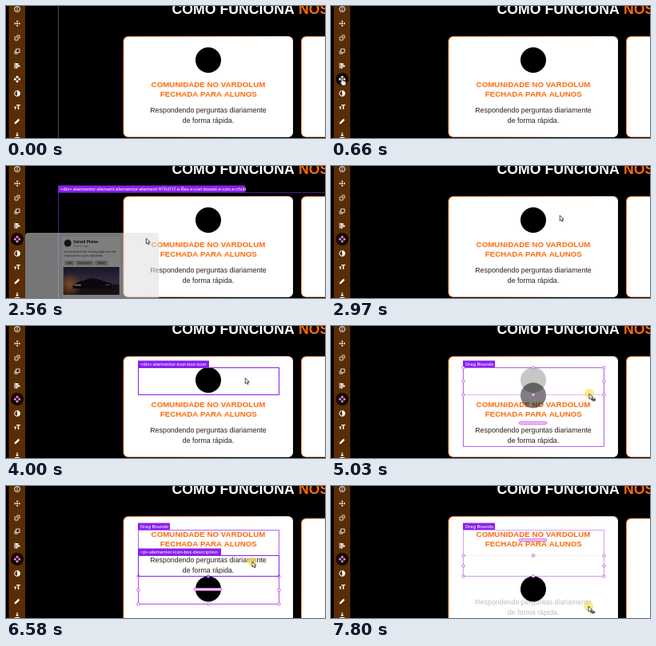
Animation of 399 by 166 pixels, one loop 8 s. Source, as an HTML page with a canvas:

```html
<!DOCTYPE html>
<html lang="pt">
<head>
<meta charset="utf-8">
<style>
html, body { margin: 0; width: 100%; height: 100%; overflow: hidden; background: #000; }
canvas { display: block; width: 399px; height: 166px; }
</style>
</head>
<body>
<canvas id="stage"></canvas>
<script>
const LOOP = 8000, W = 399, H = 166;
const ORANGE = '#ff6a0a', PURPLE = '#8a1ff0', PINK = '#c04be6';
const ARIAL = '"Liberation Sans", Arial, sans-serif';
const UI = 'Roboto, sans-serif';

const ratio = window.devicePixelRatio || 1;
const sized = canvas => Object.assign(canvas, { width: W * ratio, height: H * ratio });
const stage = sized(document.getElementById('stage')).getContext('2d');
const layer = sized(document.createElement('canvas')).getContext('2d');
let ctx = stage;

const between = (t, a, b) => t >= a && t < b;
const progress = (t, a, b) => Math.min(1, Math.max(0, (t - a) / (b - a)));
const ease = p => p * p * (3 - 2 * p);

// Pointer tip: time, x, y
const POINTER = [
  [70, 300, 172], [660, 13, 91], [2140, 13, 91], [2560, 175, 91], [2900, 284, 62],
  [3030, 288, 62], [3650, 288, 62], [3950, 296, 66], [4420, 326, 61], [4760, 326, 61],
  [5030, 323, 85], [5400, 319, 118], [5970, 319, 118], [6500, 308, 95], [6780, 308, 95],
  [6920, 322, 98], [7120, 322, 98], [7740, 322, 151]
];

function pointerAt(t) {
  const next = POINTER.findIndex(key => key[0] > t);
  if (next === 0) return POINTER[0].slice(1);
  if (next < 0) return POINTER.at(-1).slice(1);
  const [t0, x0, y0] = POINTER[next - 1], [t1, x1, y1] = POINTER[next];
  const p = progress(t, t0, t1);
  return [x0 + (x1 - x0) * p, y0 + (y1 - y0) * p];
}

function rect(x, y, w, h, fill) {
  ctx.fillStyle = fill;
  ctx.fillRect(x, y, w, h);
}

function rounded(x, y, w, h, r, fill, stroke) {
  ctx.beginPath();
  ctx.roundRect(x, y, w, h, r);
  if (fill) { ctx.fillStyle = fill; ctx.fill(); }
  if (stroke) { ctx.strokeStyle = stroke; ctx.stroke(); }
}

function disc(x, y, r, fill, stroke) {
  ctx.beginPath();
  ctx.arc(x, y, r, 0, 7);
  if (fill) { ctx.fillStyle = fill; ctx.fill(); }
  if (stroke) { ctx.strokeStyle = stroke; ctx.stroke(); }
}

function text(str, x, y, font, fill, align = 'left') {
  ctx.font = font;
  ctx.fillStyle = fill;
  ctx.textAlign = align;
  ctx.fillText(str, x, y);
}

function path(d, fill, stroke) {
  const shape = new Path2D(d);
  if (fill) { ctx.fillStyle = fill; ctx.fill(shape); }
  if (stroke) { ctx.strokeStyle = stroke; ctx.stroke(shape); }
}

function withAlpha(alpha, draw) {
  ctx.save();
  ctx.globalAlpha *= alpha;
  draw();
  ctx.restore();
}

function outline(x, y, w, h, color) {
  ctx.strokeStyle = color;
  ctx.lineWidth = 1;
  ctx.strokeRect(x + .5, y + .5, w, h);
}

function label(str, x, y, w) {
  rect(x, y + .5, w, 8.5, PURPLE);
  text(str, x + 3, y + 7, `6.2px ${UI}`, '#fff');
}

function selection(y, h, lineAlpha) {
  withAlpha(lineAlpha, () => outline(165, y, 176, h, PINK));
  ctx.lineWidth = .9;
  for (const cx of [165.5, 253, 341.5])
    for (const cy of [y, y + h / 2, y + h])
      if (cx !== 253 || cy !== y + h / 2) disc(cx, cy + .5, 1.7, '#fff', PINK);
}

function dragBounds(y, bottom, lineAlpha) {
  withAlpha(lineAlpha, () => outline(165, y, 176, bottom - y, '#9a3cf0'));
  label('Drag Bounds', 165, y - 9, 40);
}

function grip(y) {
  ctx.lineWidth = .9;
  rounded(235, y - 1.5, 35, 3, 1.5, '#f3c4f5', '#d267e4');
}

function drawCard(x, y, h) {
  const edge = ctx.createLinearGradient(x, y, x + 212, y + 60);
  edge.addColorStop(0, ORANGE);
  edge.addColorStop(.5, '#ffa05c');
  edge.addColorStop(1, '#fff0e6');
  rounded(x, y, 212.5, h, 6, edge);
  rounded(x + .9, y + .8, 211.2, h - 1.4, 5.5, '#fff');
}

function drawHeading(dy) {
  const font = `bold 9.75px ${ARIAL}`;
  text('COMUNIDADE NO VARDOLUM', 253, 102 + dy, font, ORANGE, 'center');
  text('FECHADA PARA ALUNOS', 253.3, 114 + dy, font, ORANGE, 'center');
}

function drawParagraph(dy) {
  const font = `8.85px ${ARIAL}`;
  text('Respondendo perguntas diariamente', 253, 134 + dy, font, '#2b2020', 'center');
  text('de forma rápida.', 253, 147 + dy, font, '#2b2020', 'center');
}

const badge = y => disc(253, y, 16, '#000');

function drawContent(t) {
  const moved = t >= 5450;
  const shift = moved ? -38 : 0;
  const [, py] = pointerAt(t);
  drawHeading(shift);
  if (t >= 7120) withAlpha(.3, () => drawParagraph(shift + py - 98));
  else drawParagraph(shift);

  if (moved) badge(129.5);
  else if (t >= 4760) {
    withAlpha(.22, () => badge(68));
    withAlpha(.5, () => badge(68 + (py - 61) * .8));
  } else badge(68);
}

function drawOverlays(t) {
  if (t < 660) withAlpha(1 - progress(t, 70, 600), () => rect(65, 0, 1, H, '#4b4b4b'));

  if (between(t, 2350, 2850)) {
    outline(65, 33, 400, 200, '#4a1c80');
    label('<div>.elementor-element.elementor-element-91fc01f.e-flex.e-con-boxed.e-con.e-child', 65, 24, 234);
  }
  if (between(t, 3320, 4250)) {
    outline(165, 52, 176, 34, PURPLE);
    label('<div>.elementor-icon-box-icon', 165, 43, 89);
  }
  if (between(t, 4250, 5450)) {
    dragBounds(52, 151, .8);
    selection(52, 34, t < 4760 ? 1 : .4);
    if (t >= 4830) grip(122);
  }
  if (between(t, 5450, 6680)) {
    dragBounds(55, 148, .8);
    selection(113, 35, .9);
    grip(130);
    if (t >= 6250) {
      outline(165, 87, 176, 26, PURPLE);
      label('<p>.elementor-icon-box-description', 165, 78, 104);
    }
  }
  if (t >= 6680) {
    const dragging = t >= 7120;
    dragBounds(55, dragging ? 113 : 148, dragging ? .45 : .8);
    selection(87, 26, dragging ? .1 : .9);
    if (t >= 7300) grip(68);
  }
}

function drawPhoto(x, y) {
  ctx.save();
  ctx.translate(x, y);
  const sky = ctx.createLinearGradient(0, 0, 0, 35);
  sky.addColorStop(0, '#2c2b4c');
  sky.addColorStop(.45, '#5c4670');
  sky.addColorStop(.6, '#6c4a58');
  sky.addColorStop(.66, '#241a28');
  sky.addColorStop(1, '#30202a');
  rect(0, 0, 70, 35, sky);
  const glow = ctx.createRadialGradient(8, 23, 0, 8, 23, 16);
  glow.addColorStop(0, '#e88a40');
  glow.addColorStop(1, '#e88a4000');
  rect(0, 7, 26, 28, glow);
  path('M12 24Q16 18 26 17Q34 12 45 16L60 21V27H12Z', '#12101a');
  rect(14, 22, 8, 1.5, '#ffe2c0');
  rect(52, 22, 6, 1.2, '#cf5964');
  ctx.restore();
}

// The post's photo and caption trade places while the preview is open.
function drawPost(swap) {
  rect(0, 0, 73, 78, '#ededed');
  disc(7, 8, 4.5, '#2a2426');
  text('Gerard Plume', 14, 8, `bold 5px ${UI}`, '#222');
  text('2 hours ago', 14, 12.5, `3.5px ${UI}`, '#777');
  drawPhoto(1.5, 15 + 23 * swap);

  const y = -36 * swap;
  const font = `3.8px ${UI}`;
  text('Just watched the evening light over the', 2, 56 + y, font, '#333');
  text('road and the quiet city below.', 2, 61 + y, font, '#333');
  ['Like', 'Comment', 'Share'].forEach((name, i) => {
    const x = [3, 17, 41][i], w = [12, 22, 16][i];
    rounded(x, 66 + y, w, 6, 1, '#b8b8b8');
    text(name, x + w / 2, 70.4 + y, font, '#222', 'center');
  });
}

function drawPreview(t) {
  const entering = t < 2200;
  const alpha = entering ? ease(progress(t, 1480, 2000)) : 1 - ease(progress(t, 2250, 2900));
  if (alpha <= 0) return;
  const x = entering ? 24 + 5 * progress(t, 1480, 2000) : 29 - 12 * progress(t, 2250, 2900);

  // Composed opaquely on its own layer so the panel fades as one piece.
  ctx = layer;
  ctx.setTransform(ratio, 0, 0, ratio, 0, 0);
  ctx.clearRect(0, 0, W, H);
  ctx.translate(x, 84);
  rounded(0, 0, 168, 100, 5, '#dedee0');
  ctx.translate(47, 5);
  drawPost(ease(progress(t, 2050, 2450)));

  ctx = stage;
  withAlpha(alpha, () => ctx.drawImage(layer.canvas, 0, 0, W, H));
}

const ICONS = [
  [4, () => { disc(0, 0, 3.4, null, '#fff'); path('M0 -2V-1 M0 -.3V2', null, '#fff'); }],
  [22, () => path('M0 -4L1.5 -2H-1.5Z M0 4L1.5 2H-1.5Z M-4 0L-2 1.5V-1.5Z M4 0L2 1.5V-1.5Z M-1 -1H1V1H-1Z', '#fff')],
  [40, () => path('M-1 -3H3V1 M1 -1H-3V3H1Z', null, '#ddd')],
  [57, () => path('M-1.5 -3H3V1.5H-1.5Z M-3 -1V3H1', null, '#ddd')],
  [75, () => path('M-3.5 -3.5H-2.5V3.5H-3.5Z M-2 -3H1.5V-1H-2Z M-2 -.5H3.5V1.5H-2Z M-2 2H.5V3.5H-2Z', '#fff')],
  [92, color => [[0, -2.7], [2.7, 0], [0, 2.7], [-2.7, 0]].forEach(([x, y]) => disc(x, y, 1.5, color))],
  [110, () => { disc(0, 0, 3.4, null, '#fff'); path('M0 -3.4A3.4 3.4 0 0 1 0 3.4Z', '#fff'); }],
  [127, () => path('M-1 -3H4V-1.7H2.2V3H.8V-1.7H-1Z M-4 -.5H-.7V.6H-1.8V3H-3V.6H-4Z', '#fff')],
  [145, () => path('M-3.5 3.5L-3 1.3L1.5 -3.2L3.2 -1.5L-1.3 3Z', '#fff')],
  [162, () => path('M-.6 -3H.6V0H2L0 2.3L-2 0H-.6Z M-3 3H3V4H-3Z', '#fff')]
];

function drawToolbar(t) {
  rect(3.5, 0, 20.5, H, '#5a2d05');
  if (t >= 600) disc(14, 92, 8, '#120800');
  for (const [y, draw] of ICONS) {
    ctx.save();
    ctx.translate(14, y);
    ctx.lineWidth = 1;
    draw(t < 2000 ? '#fff' : '#ff8add');
    ctx.restore();
  }
}

function drawPointer(t) {
  if (t < 70) return;
  const [x, y] = pointerAt(t);
  const pressed = between(t, 4490, 5600) || between(t, 6450, 6700) || t >= 7120;
  const dragging = between(t, 4760, 5450) || t >= 7120;
  if (pressed) withAlpha(.65, () => disc(x, y, 6, '#f4e24a'));
  ctx.save();
  ctx.translate(x, y);
  ctx.lineWidth = .8;
  if (between(t, 600, 2200)) {
    path('M0 0Q1 -1 2 0V3L5 4Q6.5 4.5 6 6L5 9H1L-1.5 5.5Q-1 4.5 0 5Z', '#fff', '#222');
  } else {
    path('M0 0V7L1.7 5.5L2.8 8L4 7.4L2.9 5H5Z', '#fff', '#222');
    if (dragging) rounded(4, 6.5, 3.5, 2.5, .5, '#777', '#333');
  }
  ctx.restore();
}

function render(t) {
  ctx.setTransform(ratio, 0, 0, ratio, 0, 0);
  rect(0, 0, W, H, '#000');
  text('COMO FUNCIONA ', 207.5, 9.8, `bold 17.7px ${ARIAL}`, '#fff');
  text('NOSSO', 366, 9.8, `bold 17.7px ${ARIAL}`, ORANGE);

  const tall = t >= 5450;
  drawCard(146.5, 38, tall ? 140 : 127);
  drawCard(369, tall ? 40.5 : 38, tall ? 140 : 127);
  drawContent(t);
  drawOverlays(t);
  drawPreview(t);
  drawToolbar(t);
  drawPointer(t);
}

function tick() {
  render(performance.now() % LOOP);
  requestAnimationFrame(tick);
}
tick();
</script>
</body>
</html>
```
